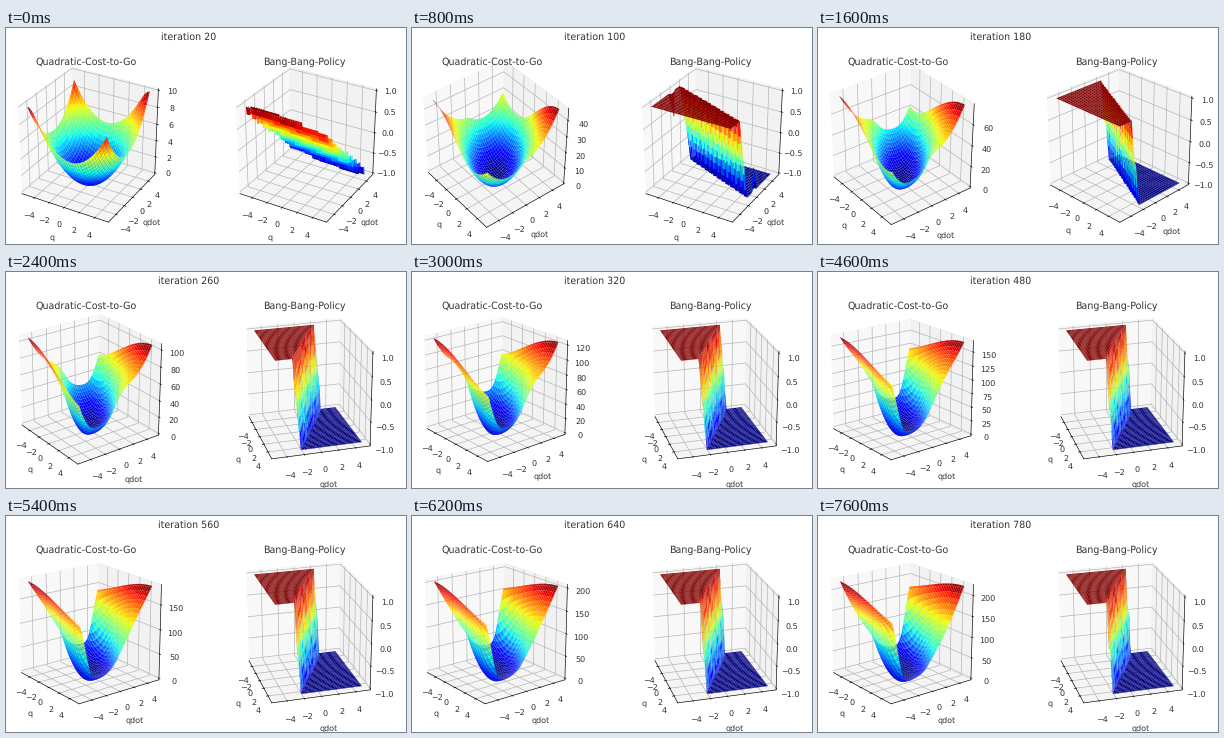
Recreate the animation shown at these times as a matplotlib script. Size 400 by 216 pixels, loop 7800 ms.

```python
import numpy as np
import matplotlib.pyplot as plt
from matplotlib.animation import FuncAnimation

W, H, DPI = 400, 216, 57.3
FRAMES, STEP_MS = 39, 200
SWEEPS = 20  # value-iteration sweeps between two pictures
DT, N = 0.01, 101

ink = "0.2"
plt.rcParams.update({"text.hinting": "none", "text.color": ink,
                     "axes.labelcolor": ink, "xtick.labelcolor": ink,
                     "ytick.labelcolor": ink})

grid = np.linspace(-5, 5, N)
h = grid[1] - grid[0]
Q, V = np.meshgrid(grid, grid, indexing="ij")
actions = np.linspace(-1, 1, 11)


def slopes(J, axis):
    """Forward and backward differences, flat beyond the border."""
    d = np.diff(J, axis=axis) / h
    zero = np.zeros_like(np.take(J, [0], axis))
    return np.concatenate([d, zero], axis), np.concatenate([zero, d], axis)


def sweep(J):
    """One step of value iteration for the double integrator."""
    fwd, back = slopes(J, 0)
    moved = J + DT * V * np.where(V > 0, fwd, back)
    fwd, back = slopes(moved, 1)
    costs = [DT * (u * u + u * (fwd if u > 0 else back)) for u in actions]
    best = np.argmin(costs, axis=0)
    return moved + DT * (Q**2 + V**2) + np.min(costs, axis=0), actions[best]


history = []
J = np.zeros((N, N))
for k in range(1, FRAMES * SWEEPS + 1):
    J, policy = sweep(J)
    if k % SWEEPS == 0:
        history.append((J, policy))


def camera(i, times, elev, azim):
    return np.interp(i, times, elev), np.interp(i, times, azim)


def cost_view(i):
    return camera(i, (0, 4, 12, 18, 22), (30, 41, 25, 17, 19),
                  (-60, -38, -36, -42, -37))


def policy_view(i):
    return camera(i, (6, 12), (30, 23), (-60, -16))


fig = plt.figure(figsize=((W + 0.01) / DPI, (H + 0.01) / DPI), dpi=DPI)


def label(x, y, text=""):
    return fig.text(x / W, 1 - y / H, text, ha="center", va="baseline", size=12)


def panel(cx, title, cy=116, size=168):
    label(cx, 37, title)
    box = [(cx + 0.7 - size / 2) / W, 1 - (cy + size / 2) / H,
           size / W, size / H]
    return fig.add_axes(box, projection="3d", box_aspect=(1, 1, 1))


heading = label(182.7, 11.5)
cost_ax = panel(80.5, "Quadratic-Cost-to-Go")
policy_ax = panel(298.5, "Bang-Bang-Policy")


def surface(ax, Z, view):
    ax.clear()
    ax.patch.set_visible(False)
    ax.plot_surface(Q, V, Z, cmap="jet")
    ax.set(xlabel="q", ylabel="qdot")
    ax.view_init(*view)


def draw(i):
    heading.set_text(f"iteration {(i + 1) * SWEEPS}")
    cost, policy = history[i]
    surface(cost_ax, cost, cost_view(i))
    surface(policy_ax, policy, policy_view(i))


anim = FuncAnimation(fig, draw, frames=FRAMES, interval=STEP_MS, repeat=True,
                     init_func=lambda: None)
plt.show()
```
